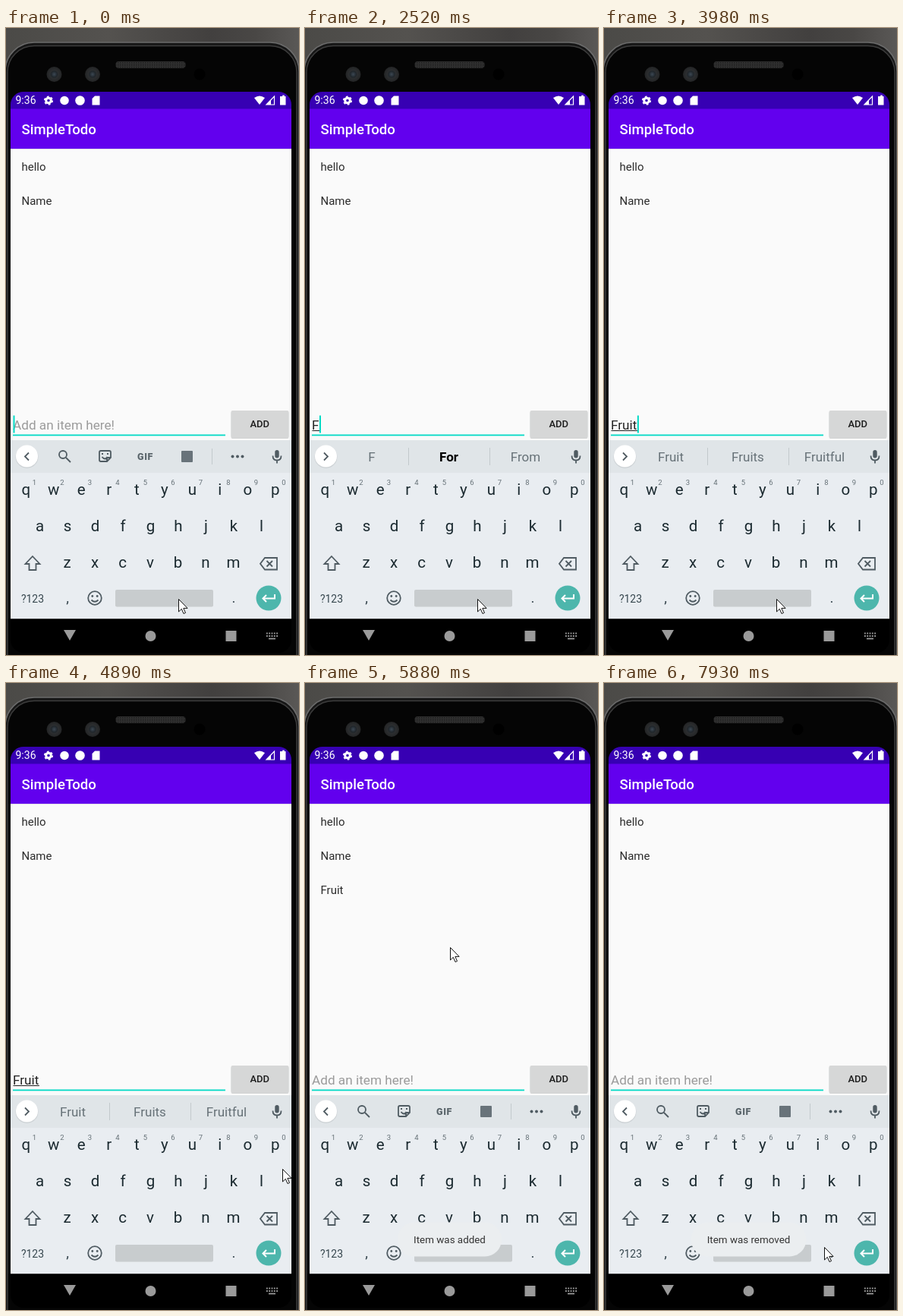
An HTML page for the animation above (8000 ms loop, 386 by 826 pixels).

```html
<!DOCTYPE html>
<html lang="en">
<head>
<meta charset="utf-8">
<title>Todo list</title>
<style>
  html, body { margin: 0; width: 100%; height: 100%; overflow: hidden; background: #111; }
  svg { display: block; width: 386px; height: 826px; }
  text { font-family: Roboto, sans-serif; white-space: pre; }
  .mid { text-anchor: middle; }
  .line { fill: none; stroke: #4f5b62; stroke-width: 1.8; }
</style>
</head>
<body>
<svg viewBox="0 0 386 826">
  <defs>
    <linearGradient id="desk">
      <stop offset="0" stop-color="#4b4a47"/><stop offset=".35" stop-color="#54524f"/>
      <stop offset=".7" stop-color="#42403f"/><stop offset=".85" stop-color="#494745"/>
      <stop offset="1" stop-color="#5a5856"/>
    </linearGradient>
    <radialGradient id="lens">
      <stop offset="0" stop-color="#3c4854"/><stop offset=".4" stop-color="#20262b"/>
      <stop offset=".55" stop-color="#2c2e30"/><stop offset="1" stop-color="#232425"/>
    </radialGradient>
    <pattern id="mesh" width="3" height="3" patternUnits="userSpaceOnUse">
      <rect width="3" height="3" fill="#303030"/><rect width="1.5" height="1.5" fill="#1c1c1c"/>
    </pattern>
    <clipPath id="screen"><rect x="6" y="84" width="370" height="739" rx="17"/></clipPath>
  </defs>

  <!-- Phone body -->
  <rect width="386" height="60" fill="url(#desk)"/>
  <rect x="-1" y="19" width="387" height="860" rx="38" fill="#161616" stroke="#6b6b6b" stroke-width="1.6"/>
  <rect x="2" y="23.500" width="381" height="860" rx="35" fill="#050505" stroke="#3c3c3c" stroke-width="1.5"/>
  <circle cx="63.500" cy="61" r="10" fill="url(#lens)"/>
  <circle cx="114" cy="61" r="10" fill="url(#lens)"/>
  <rect x="144.500" y="44" width="92" height="9" rx="4" fill="url(#mesh)"/>
  <circle cx="255" cy="61" r="7.500"/>

  <g clip-path="url(#screen)">
    <rect x="6" y="84" width="370" height="23" fill="#3700b3"/>
    <rect x="6" y="106.500" width="370" height="53" fill="#6200ee"/>
    <rect x="6" y="159" width="370" height="385" fill="#fafafa"/>
    <rect x="6" y="159" width="370" height="1" fill="#ddd8e8"/>
    <rect x="6" y="543" width="370" height="43" fill="#e0e5e8"/>
    <rect x="6" y="586" width="370" height="192.500" fill="#e9edf1"/>
    <rect x="6" y="778.500" width="370" height="44.500"/>
  </g>

  <!-- Status bar -->
  <g fill="#fff">
    <text x="12.500" y="100" font-size="14">9:36</text>
    <circle cx="56" cy="95.500" r="3.300" fill="none" stroke="#fff" stroke-width="3"/>
    <circle cx="56" cy="95.500" r="5.200" fill="none" stroke="#fff" stroke-width="1.800" stroke-dasharray="2.720"/>
    <circle cx="77" cy="95.500" r="5.800"/>
    <circle cx="97.500" cy="95.500" r="6.300"/>
    <path d="M117 89.500h6.500v12h-10v-8.500z"/>
    <path d="M327 92q7-5 14 0l-7 9z"/>
    <path d="M353.500 90v11h-10.500z" fill="none" stroke="#fff" stroke-width="1.200"/>
    <path d="M349 95v6h-6z"/>
    <path d="M363 90h1.200v-1.500h2.600V90h1.700v11.500H361V90z"/>
    <text x="20.500" y="140" font-size="18.600" font-weight="500">SimpleTodo</text>
  </g>

  <!-- List and entry field -->
  <g font-size="15" fill="#2c2c2c">
    <text x="20.500" y="187.500">hello</text>
    <text x="20.500" y="232.500">Name</text>
    <text id="item" x="20.500" y="278">Fruit</text>
  </g>
  <rect x="9" y="535.500" width="280" height="1.800" fill="#03dac5"/>
  <text id="hint" x="9" y="529" font-size="17.200" fill="#9b9b9b">Add an item here!</text>
  <text id="entry" x="9" y="529" font-size="17.200" fill="#222"></text>
  <rect id="compose" x="9.500" y="530" height="1" fill="#222"/>
  <rect id="caret" y="510.500" width="2" height="23" fill="#03dac5"/>
  <rect x="296.500" y="505" width="76" height="36" rx="2" fill="#d4d5d5"/>
  <rect x="296.500" y="504" width="76" height="35.500" rx="2" fill="#d6d7d7"/>
  <text class="mid" x="334.300" y="526" font-size="13" font-weight="500" fill="#1d1d1d">ADD</text>

  <!-- Keyboard strip -->
  <circle cx="27.500" cy="565" r="15" fill="#cdd2d5"/>
  <circle cx="27.500" cy="564" r="14.500" fill="#fff"/>
  <path id="chevron" class="line"/>
  <g id="tools">
    <circle class="line" cx="75" cy="562" r="5"/>
    <path class="line" d="M79 566l6 6"/>
    <path class="line" d="M125 557h11q2 0 2 2v7l-5 5h-8q-2 0-2-2v-10q0-2 2-2zM138 566h-5v5M126.500 565q4 5 7 0" stroke-width="1.500"/>
    <path d="M126 560h2v2h-2zM133 560h2v2h-2z" fill="#4f5b62"/>
    <text class="mid" x="183.500" y="568.500" font-size="12.500" font-weight="900" letter-spacing=".6" fill="#5b666c">GIF</text>
    <rect x="231" y="557" width="15" height="15" rx="1" fill="#68737a"/>
    <path d="M271.500 554v21" stroke="#c3c9cc"/>
    <g fill="#4f5b62"><circle cx="298.500" cy="564.500" r="2"/><circle cx="305" cy="564.500" r="2"/><circle cx="311.500" cy="564.500" r="2"/></g>
  </g>
  <g id="words" font-size="17" class="mid">
    <path d="M136.500 553v23M243.500 553v23" stroke="#c3c9cc"/>
    <text x="88" y="571"></text><text x="189.500" y="571"></text><text x="290.500" y="571"></text>
  </g>
  <rect x="354.300" y="556" width="5.400" height="10.500" rx="2.700" fill="#4f5b62"/>
  <path class="line" d="M351.500 563.500q0 6 5.500 6t5.500-6M357 569.500v4" stroke-width="1.600"/>

  <!-- Keys -->
  <g id="keys" class="mid" fill="#1b2a30"></g>
  <path class="line" d="M35 696l9.500 10h-5v8h-9v-8h-5z"/>
  <path class="line" d="M341 698h16v15.500h-16l-6-7.750zM343.500 702l7.500 7.500M351 702l-7.500 7.500"/>
  <g font-size="14" class="mid" fill="#37474f">
    <text x="35" y="756.500">?123</text>
    <text x="81" y="756.500" font-size="19">,</text>
    <text x="300" y="756.500" font-size="19">.</text>
  </g>
  <circle class="line" cx="117" cy="751" r="8.800"/>
  <path class="line" d="M112.500 753.500q4.500 4.500 9 0"/>
  <circle cx="113.800" cy="748.500" r="1.400" fill="#4f5b62"/>
  <circle cx="120.200" cy="748.500" r="1.400" fill="#4f5b62"/>
  <rect x="144" y="740" width="129" height="22.500" rx="2" fill="#c8ccce"/>
  <circle cx="346" cy="751" r="16.500" fill="#4db6ac"/>
  <path d="M354 746v5.500h-15M343 747l-4.500 4.500 4.500 4.500" fill="none" stroke="#fff" stroke-width="2"/>

  <!-- Navigation bar -->
  <g fill="#9a9a9a">
    <path d="M76 793h16l-8 14z"/>
    <circle cx="190.500" cy="801" r="7"/>
    <rect x="289.500" y="794" width="14" height="14"/>
    <path d="M343 797.500h15M343 801h15" stroke="#9a9a9a" stroke-width="1.800" stroke-dasharray="1.800 1.500"/>
    <path d="M346 804.500h9" stroke="#9a9a9a" stroke-width="1.800"/>
  </g>

  <g id="toast">
    <rect y="710.500" height="45" rx="22" fill="#ebeef0"/>
    <text class="mid" x="190.500" y="738" font-size="13.400" fill="#333"></text>
  </g>
  <path id="mouse" d="M-.5-.5v16.500l3.800-3.700 2.700 6.200 2.500-1.100-2.700-6h5.300z" fill="#fff" stroke="#111"/>
</svg>
<script>
const $ = id => document.getElementById(id);
const DURATION = 8000;

const label = (x, y, size, text, extra = '') =>
  `<text x="${x}" y="${y}" font-size="${size}" ${extra}>${text}</text>`;

const rows = [['qwertyuiop', 26.3, 615], ['asdfghjkl', 44.5, 663], ['zxcvbnm', 80.5, 710.5]];
$('keys').innerHTML = rows.map(([letters, left, y], row) =>
  [...letters].map((letter, i) => {
    const x = left + i * 36.5;
    const digit = row ? '' : label(x + 11, 601.5, 9.5, (i + 1) % 10, 'fill="#667177"');
    return label(x, y, 20.5, letter) + digit;
  }).join('')).join('');

// Each step holds until the next; properties carry over.
const steps = [
  [0, { text: '', caret: 1, compose: 1, words: null, bold: 1, item: 0, toast: '', mouse: [228, 753] }],
  [560, { caret: 0 }],
  [1120, { caret: 1 }],
  [1500, { caret: 0 }],
  [2090, { caret: 1 }],
  [2370, { text: 'F' }],
  [2520, { words: ['F', 'For', 'From'] }],
  [2820, { text: 'Fr', words: ['Fr', 'From', 'Friday'] }],
  [2940, { text: 'Fru', words: ['Fru', 'Fruit', 'Frustrated'] }],
  [3060, { text: 'Frui', words: ['Frui', 'Fruit', 'Fruits'] }],
  [3310, { text: 'Fruit', words: ['Fruits', 'Fruit', 'Fruitful'] }],
  [3580, { text: 'Fruit ', compose: 0 }],
  [3720, { words: ['and', 'is', 'for'], bold: 0 }],
  [3960, { text: 'Fruit', compose: 1, words: ['Fruit', 'Fruits', 'Fruitful'] }],
  [4470, { caret: 0 }],
  [4740, { mouse: [300, 735] }],
  [4890, { mouse: [365, 641] }],
  [5010, { mouse: [375, 590], caret: 1 }],
  [5160, { mouse: [354, 543] }],
  [5310, { mouse: [342, 522] }],
  [5450, { text: '', words: null, item: 1 }],
  [5610, { mouse: [335, 512], toast: 'added' }],
  [5760, { mouse: [313, 432] }],
  [5880, { mouse: [192, 349], caret: 0 }],
  [6000, { mouse: [115, 308] }],
  [6130, { mouse: [76, 288] }],
  [6260, { mouse: [60, 278] }],
  [6390, { mouse: [53, 272], caret: 1 }],
  [6530, { mouse: [49, 269] }],
  [6680, { mouse: [48, 268] }],
  [6810, { caret: 0 }],
  [7080, { item: 0 }],
  [7390, { mouse: [90, 340], caret: 1 }],
  [7520, { mouse: [190, 440] }],
  [7660, { mouse: [256, 495], toast: 'removed' }],
  [7800, { mouse: [285, 640] }],
  [7930, { mouse: [291, 744], caret: 0 }],
];

const show = (id, visible) => $(id).setAttribute('visibility', visible ? 'visible' : 'hidden');

function render(time) {
  const state = Object.assign({}, ...steps.filter(([start]) => start <= time).map(step => step[1]));

  $('entry').textContent = state.text;
  const width = state.text ? $('entry').getComputedTextLength() : 0;
  $('caret').setAttribute('x', 9.5 + width);
  $('compose').setAttribute('width', width);
  show('caret', state.caret);
  show('compose', state.text && state.compose);
  show('hint', !state.text);
  show('item', state.item);

  show('tools', !state.words);
  show('words', state.words);
  $('chevron').setAttribute('d', state.words ? 'M25 559.500l5 5-5 5' : 'M30 559.500l-5 5 5 5');
  $('words').querySelectorAll('text').forEach((node, i) => {
    const bold = state.bold && i === 1;
    node.textContent = state.words ? state.words[i] : '';
    node.setAttribute('font-weight', bold ? 700 : 400);
    node.setAttribute('fill', bold ? '#000' : '#667177');
  });

  show('toast', state.toast);
  const [box, message] = $('toast').children;
  message.textContent = 'Item was ' + state.toast;
  const toastWidth = message.getComputedTextLength() + 42;
  box.setAttribute('width', toastWidth);
  box.setAttribute('x', 190.5 - toastWidth / 2);

  $('mouse').setAttribute('transform', `translate(${state.mouse})`);
}

const begin = performance.now();
function tick() {
  render((performance.now() - begin) % DURATION);
  requestAnimationFrame(tick);
}
tick();
</script>
</body>
</html>
```
